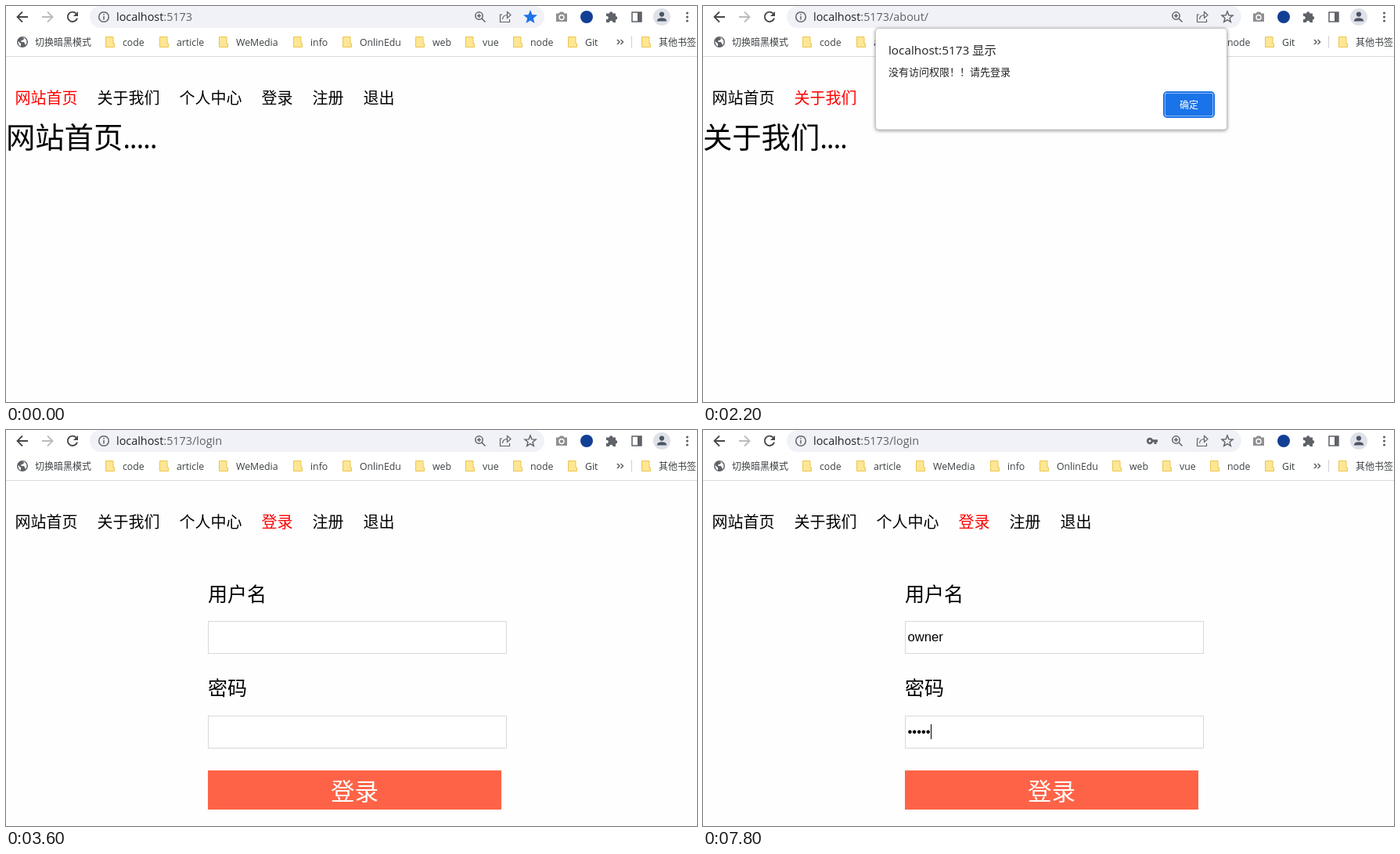
An HTML page that plays this animation: 883 by 506 pixels, repeating every 8000 ms.

```html
<!DOCTYPE html>
<html lang="zh-CN">
<head>
<meta charset="utf-8">
<title>Login guard</title>
<style>
html, body { margin: 0; width: 100%; height: 100%; overflow: hidden; background: #fefefe; }
svg { display: block; width: 100%; height: 100%; }
text { font-family: 'Open Sans', 'Noto Sans CJK SC', 'Noto Sans CJK', sans-serif; white-space: pre; }
.line { fill: none; stroke: #5f6368; stroke-width: 1.5; }
.dark { fill: #5f6368; }
#marks text { font-size: 12.3px; fill: #3c4043; }
#marks .zh { font-size: 12px; }
#nav { font-size: 20px; }
#form text { font-size: 25px; }
#form .typed { font: 16.67px 'Liberation Sans', Arial, sans-serif; }
.field { fill: #fff; stroke: #d9d9d9; }
#box { filter: drop-shadow(0 1px 2px #0006); }
</style>
</head>
<body>
<svg viewBox="0 0 883 506">
  <rect width="883" height="64" fill="#fff"/>
  <path d="M0 64.5H883" stroke="#d9dadc"/>
  <rect x="107" y="0" width="581" height="28" rx="14" fill="#f0f2f7"/>

  <path class="line" d="M28 14H15M21 7.5L14.5 14L21 20.5" style="stroke:#45484c;stroke-width:1.8"/>
  <path class="line" d="M46 14H59M53 7.5L59.5 14L53 20.5" style="stroke:#b9bbbe;stroke-width:1.8"/>
  <path class="line" d="M89.6 9.6A6.2 6.2 0 1 0 91 15.5" style="stroke:#45484c;stroke-width:1.9"/>
  <path d="M92 7V13H86Z" fill="#45484c"/>
  <circle class="line" cx="125" cy="14" r="6.3"/>
  <path class="line" d="M125 13V17.5M125 10.3V11.8"/>

  <text y="19" font-size="14.4" fill="#5f6368" x="141"><tspan fill="#202124">localhost</tspan>:5173<tspan id="path"></tspan></text>

  <g id="key" class="dark">
    <path d="M574 12.3H581V15.6H579.5V18H576.5V15.6H574Z"/>
    <circle cx="571" cy="14" r="4.2"/><circle cx="571" cy="14" r="1.5" fill="#f0f2f7"/>
  </g>
  <circle class="line" cx="604.5" cy="12.5" r="4.7"/>
  <path class="line" d="M608 16L612.5 20.5M602 12.5H607M604.5 10V15"/>
  <path class="line" d="M634 11H631.5V20.5H643.5V17M634.5 17Q635 11.5 641 11.5M640.5 7.5L645 11.5L640.5 15.5Z" style="stroke-width:1.2"/>
  <path id="star" stroke-width="1.4"/>

  <path d="M703 9.5H706.5L708 7.5H712L713.5 9.5H717V20H703Z" fill="#8d8f92"/>
  <circle cx="710" cy="14.5" r="3" fill="#8d8f92" stroke="#fff" stroke-width="1.4"/>
  <circle cx="742" cy="14" r="8" fill="#123f94"/>
  <path class="dark" d="M767 9.5H771A2.2 2.2 0 1 1 775.4 9.5H779V13A2.2 2.2 0 1 1 779 17.4V21H775.5A2.1 2.1 0 1 0 771 21H767V17A2.1 2.1 0 1 0 767 13Z"/>
  <rect class="line" x="800" y="8" width="12" height="12"/>
  <rect class="dark" x="807" y="8" width="5" height="12"/>
  <circle cx="838" cy="14" r="11" fill="#dfe1e8"/>
  <circle cx="838" cy="10.6" r="3.1" fill="#4c5566"/>
  <path d="M832 19.5V18.3Q833 15.3 838 15.3T844 18.3V19.5Z" fill="#4c5566"/>
  <g class="dark"><circle cx="870.5" cy="9" r="1.6"/><circle cx="870.5" cy="14" r="1.6"/><circle cx="870.5" cy="19" r="1.6"/></g>

  <g id="marks">
    <circle class="dark" cx="21" cy="46" r="7"/>
    <path d="M15.5 45L19 48V51.5Q15.5 50 15.5 45ZM20 40.5H23.5L22 43.5L19.5 44V46H23L25 50Q27 48 26.3 44L24 41Z" fill="#fff"/>
    <text class="zh" x="37" y="50.6">切换暗黑模式</text>
    <path class="line" d="M781 43L784 46L781 49M785.5 43L788.5 46L785.5 49"/>
    <path d="M799.5 38V54" stroke="#cfd1d4"/>
  </g>

  <g id="nav"></g>
  <text id="title" x="0" y="182" font-size="37.3"><tspan id="head"></tspan><tspan id="dots" letter-spacing="-1.3"></tspan></text>

  <g id="form">
    <text x="258" y="218.5">用户名</text>
    <rect class="field" x="258.5" y="244.5" width="381" height="41"/>
    <text id="user" class="typed" x="261.5" y="270"></text>
    <text x="258" y="338.5">密码</text>
    <rect class="field" x="258.5" y="365.5" width="381" height="41"/>
    <text id="pass" class="typed" x="261.5" y="391"></text>
    <rect id="caret" width="1" height="19"/>
    <rect x="258" y="435" width="375" height="50" fill="#ff6347"/>
    <text x="415" y="473" fill="#fff" style="font-size:30.5px">登录</text>
  </g>

  <g id="alert">
    <rect id="box" x="220.5" y="28.5" width="449" height="129.5" rx="4" fill="#fff" stroke="#c4c4c4"/>
    <text x="237" y="62" font-size="15.3" fill="#202124">localhost:5173 显示</text>
    <text x="237" y="88.8" font-size="13" fill="#202124">没有访问权限！！请先登录</text>
    <rect id="ring" x="589" y="110" width="64" height="32" rx="4" fill="#fff" stroke="#1a73e8" stroke-width="2"/>
    <rect id="ok" x="590.5" y="111.5" width="61" height="29" rx="3"/>
    <text x="609" y="131" font-size="12" fill="#fff">确定</text>
  </g>
</svg>
<script>
const LOOP = 8000;
const $ = id => document.getElementById(id);
const make = (parent, tag, attrs, text = '') => {
  const el = document.createElementNS('http://www.w3.org/2000/svg', tag);
  for (const k in attrs) el.setAttribute(k, attrs[k]);
  el.textContent = text;
  return parent.appendChild(el);
};
const show = (el, on) => el.style.display = on ? '' : 'none';

const folders = { code: 127, article: 196, WeMedia: 272, info: 367, OnlinEdu: 430,
  web: 523, vue: 587, node: 648, Git: 718, 其他书签: 812 };
for (const [name, x] of Object.entries(folders)) {
  make($('marks'), 'path', { d: `M${x + .5} 39.5h9.5v8.5h1.5v4.5h-11z`, fill: '#ffe694', stroke: '#e9c650' });
  make($('marks'), 'text', { x: x + 22, y: 50.6, class: name === '其他书签' ? 'zh' : '' }, name);
}

const navX = { 网站首页: 11.5, 关于我们: 116.5, 个人中心: 221.5, 登录: 326.5, 注册: 391.5, 退出: 456.5 };
const links = Object.entries(navX).map(([name, x]) => make($('nav'), 'text', { x, y: 124.6 }, name));

const starPath = Array.from({ length: 10 }, (_, i) => {
  const r = i % 2 ? 3.2 : 7.4, a = i * Math.PI / 5;
  return `${670 + r * Math.sin(a)} ${14.4 - r * Math.cos(a)}`;
}).join('L');
$('star').setAttribute('d', `M${starPath}Z`);

const pages = [
  { from: 0, path: '', link: 0, head: '网站首页', dots: '.....' },
  { from: 900, path: '/about/', link: 1, head: '关于我们', dots: '....' },
  { from: 3500, path: '/login', link: 3, head: '', dots: '' },
];
const userKeys = [4800, 4900, 5100, 5200, 5400];
const passKeys = [6900, 7100, 7400, 7600, 7800];
const typed = (text, keys, t) => text.slice(0, keys.filter(k => t >= k).length);

function drawPage(t) {
  const page = pages.findLast(p => t >= p.from);
  $('path').textContent = page.path;
  $('head').textContent = page.head;
  $('dots').textContent = page.dots;
  links.forEach((el, i) => el.setAttribute('fill', i === page.link ? '#f00' : '#000'));
  $('star').setAttribute('fill', t < 900 ? '#1a73e8' : 'none');
  $('star').setAttribute('stroke', t < 900 ? '#1a73e8' : '#5f6368');
  show($('form'), t >= 3500);
  show($('key'), t >= 6900);
}

function drawTyping(t) {
  $('user').textContent = typed('owner', userKeys, t);
  $('pass').textContent = typed('•••••', passKeys, t);
  const inPass = t >= 6400;
  const width = $(inPass ? 'pass' : 'user').getComputedTextLength();
  $('caret').setAttribute('x', Math.floor(262 + width));
  $('caret').setAttribute('y', inPass ? 376 : 255.5);
  show($('caret'), (t >= 4200 && t < 4700) || (t >= 4800 && t < 5900) || inPass);
}

function drawAlert(t) {
  const opening = t < 2200, closing = t >= 3500, pressed = t >= 3000;
  const lift = opening ? 9.3 : closing ? 11 : 0;
  show($('alert'), t >= 2100 && t < 3600);
  $('alert').setAttribute('opacity', opening ? .72 : closing ? .8 : 1);
  $('alert').setAttribute('transform', lift ? `translate(-1.3 ${-lift}) scale(1.003 1)` : '');
  $('ok').setAttribute('fill', pressed && !closing ? '#4886de' : '#1a73e8');
  show($('ring'), !closing);
}

function frame(now) {
  const t = now % LOOP;
  drawPage(t);
  drawTyping(t);
  drawAlert(t);
  requestAnimationFrame(frame);
}
frame(0);
</script>
</body>
</html>
```
